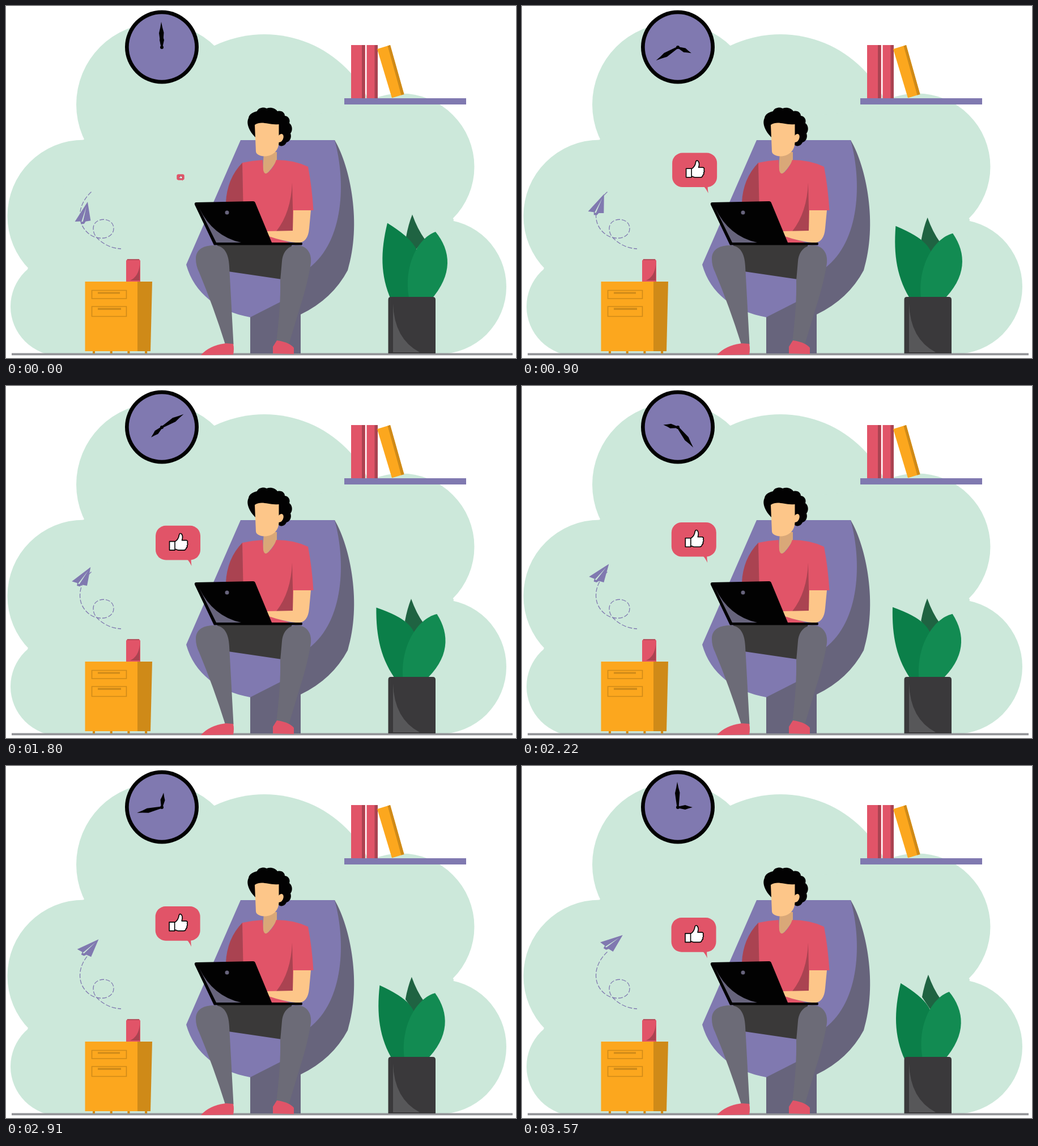
An HTML page with a canvas that plays this animation: 900 by 622 pixels, repeating every 3600 ms.

```html
<!DOCTYPE html>
<html lang="en">
<head>
<meta charset="utf-8">
<title>Working from the armchair</title>
<style>
html, body { margin: 0; width: 100%; height: 100%; overflow: hidden; background: #fff; }
canvas { display: block; width: 900px; height: 622px; }
</style>
</head>
<body>
<canvas id="stage" width="900" height="622"></canvas>
<script>
const ctx = document.getElementById('stage').getContext('2d');
const LOOP = 3600, STEP = 30, RAD = Math.PI / 180;
const C = {
  mint: '#cce8da', purple: '#8079b0', slate: '#67647c', red: '#e15468', wine: '#aa4351',
  amber: '#fca71e', ochre: '#cf8a18', skin: '#fdc689', neck: '#d9a878', ink: '#020202',
  coal: '#3a393b', ash: '#575759', leg: '#6c6b77', leaf: '#0b7f49', leafLight: '#128b52', leafDark: '#1f6342'
};

const shape = (d, color) => { ctx.fillStyle = color; ctx.fill(new Path2D(d)); };
const rect = (x, y, w, h, color) => { ctx.fillStyle = color; ctx.fillRect(x, y, w, h); };
const disc = (x, y, r, color) => {
  ctx.fillStyle = color;
  ctx.beginPath();
  ctx.arc(x, y, r, 0, 7);
  ctx.fill();
};
const outline = (d, color, width) => {
  ctx.strokeStyle = color;
  ctx.lineWidth = width;
  ctx.stroke(new Path2D(d));
};
const placed = (x, y, angle, draw) => {
  ctx.save();
  ctx.translate(x, y);
  ctx.rotate(angle * RAD);
  draw();
  ctx.restore();
};

function backdrop() {
  rect(0, 0, 900, 622, '#fff');
  ctx.save();
  ctx.beginPath();
  ctx.rect(0, 0, 900, 614);
  ctx.clip();
  disc(95, 531, 87, C.mint);
  disc(137, 371, 134.5, C.mint);
  disc(268, 174, 144, C.mint);
  disc(456, 254, 204, C.mint);
  disc(697, 284, 129.5, C.mint);
  disc(764, 496, 119, C.mint);
  shape('M95 614L38 465L137 236L368 70L456 200L640 180L790 377L764 614Z', C.mint);
  ctx.restore();
  rect(10, 613.4, 884, 3.8, '#939498');
}

function shelf() {
  rect(609, 69, 25, 94, C.red);
  rect(628, 69, 5, 94, C.wine);
  rect(636.5, 69, 19.5, 94, C.red);
  rect(650.5, 69, 5.5, 94, C.wine);
  shape('M655 76L678 69L702.5 156L681 162.5Z', C.amber);
  shape('M673.5 70.5L678 69L702.5 156L697.5 157.5Z', C.ochre);
  rect(597, 163, 215, 11, C.purple);
}

function clock(t) {
  const hour = 450 * t / 3570;
  // The minute hand slows down in three steady stages.
  const minute = Math.min(0.3 * t, 60 + 0.2 * t, 720 - 0.1535 * (3570 - t));
  disc(275, 72.5, 65, C.ink);
  disc(275, 72.5, 58.3, C.purple);
  placed(275, 73, hour, () => shape('M0-26Q2-18 4-13L1.2 0H-1.2L-4-13Q-2-18 0-26Z', C.ink));
  placed(275, 73, minute, () => shape('M-1-45Q1-34 3.5-26L1.5 0H-1.5L-5-25Q-2.5-35-1-45Z', C.ink));
  disc(275, 73, 3, C.ink);
}

function cabinet() {
  for (let i = 0; i < 4; i++) rect(153 + i * 30.7, 609, 4, 5, C.ochre);
  rect(139.5, 487, 92.5, 123, C.amber);
  shape('M232 487H258L255 610H232Z', C.ochre);
  outline('M151.5 502.5H212.5V517H151.5ZM151.5 531H212.5V548.5H151.5Z', C.ochre, 1.6);
  rect(162, 505.5, 39, 3, C.ochre);
  rect(162, 533.5, 41, 3.5, C.ochre);
  shape('M214 447.5H235L237 450V487H212V450Z', C.red);
  rect(214, 447.5, 21, 1.5, C.wine);
  shape('M236 457V485H219Q234 478 236 457Z', C.wine);
}

function trail() {
  ctx.setLineDash([8, 3]);
  outline('M150.5 328.5C125 352 124 386 147 403C164 416 190 411 190 393C190 372 154 372 154 393C154 402 158 408 164 413Q181 428 203 429', C.purple, 1.3);
  ctx.setLineDash([]);
}

function plane(t) {
  const u = t / LOOP;
  placed(144 + 34.5 * u ** 2.7, 346 - 57 * u + 9.5 * u * u, 14 + 40 * u, () => {
    shape('M0 0L-13.3 39.5L-3.5 36.5L-1.5 41L3.5 39L5 34.5L13.3 31Z', C.purple);
    shape('M0 8L-2 37L0.5 36Z', C.mint);
  });
}

function chair() {
  shape('M580 237C608 285 628 385 603 467Q576 518 520 545V614H431V545L484 515Z', C.slate);
  shape('M414 237H580C600 310 597 415 535 463L484 523L431 550C375 540 332 508 318 457Z', C.purple);
}

function head() {
  shape('M455 258H478V273Q467 291 460 296Q454 298 453 290Z', C.neck);
  shape('M440 232C430 222 423 208 428 198C429 190 438 187 443 186C445 179 456 178 460 181C467 178 476 181 479 186C487 184 492 189 492 194C499 195 502 201 500 207C506 211 506 221 502 225C505 233 500 240 495 241C491 249 483 249 480 244Z', C.ink);
  shape('M439 210C452 202 463 211 481.5 209V229C486 223 491 227 489.5 233Q488 240 481.5 241C481 263 460 268 449 264.5Q441 262 441 257Z', C.skin);
}

function torso() {
  shape('M417 277Q435 273 453 272L454 290C456 299 461 296 464 293Q473 284 477 272Q508 272 533 284Q540 320 542.5 361H507V398H418Z', C.red);
  shape('M417 277Q390 305 388 347H418.5Z', C.wine);
  shape('M505 312L507 398H477Q503 365 505 312Z', C.wine);
  shape('M462 406L504 419H464Z', C.red);
  shape('M507 361H538L535 393Q533 418 515 418.5Q490 416 464 407L460 398L506 397Z', C.skin);
}

function legs() {
  shape('M372 421H505L487 483L392 469Z', '#3a3939');
  shape('M335 447C335 429 350 423 367 423C385 423 393 437 394 460L401.5 598H387Q366 531 341 471Q335 459 335 447Z', C.leg);
  shape('M487 451C489 432 500 423 513 423C530 423 540 436 538 454Q534 484 519 532L499 598L477 593Q485 530 484 485Z', C.leg);
  shape('M344 617Q358 600 388 596L401 597Q403 606 401 616Z', C.red);
  shape('M471 614V602L478 591Q500 594 508 604V615Z', C.red);
}

function laptop() {
  shape('M333 351Q332 347 336 347L436 345Q439 345 440 348L469 418H522Q524 420 522 422.5H367Z', C.ink);
  shape('M341 357Q365 407 415 418H371Z', C.slate);
  disc(390, 365, 3.5, C.slate);
}

function plant(t) {
  const sway = Math.sin(Math.PI * t / LOOP), drift = -4.3 * t / LOOP;
  placed(-2 * sway, 7.4 * sway, 0, () =>
    shape('M717 368.5Q710 386 706 408L722 432L739 412Q726 394 717 368.5Z', C.leafDark));
  placed(699 + drift, 464, -13 * sway, () =>
    shape('M-26-80.5C-38-31-39 12-19 56H23C37 17 35-22 21-41Q10-58-26-80.5Z', C.leaf));
  placed(726 + drift, 440, 6.7 * sway, () =>
    shape('M32-41C-2-29-26 25-14 80H23C64 34 59-8 32-41Z', C.leafLight));
  shape('M674.5 519Q674.5 514 679 514H753Q758 514 758 519V614H674.5Z', C.coal);
  shape('M683 526Q685 588 730 612H683Z', C.ash);
}

function bubble(t) {
  const size = Math.min(1, 0.17 + t / 720);
  const x = 303 + 5 * Math.exp(-t / 800);
  const y = Math.max(268, 302.5 - 0.0141 * t) + 0.0304 * Math.max(0, t - 2570);
  placed(x, y, 0, () => {
    ctx.scale(size, size);
    ctx.fillStyle = C.red;
    ctx.beginPath();
    ctx.roundRect(-39.5, -30.3, 79, 60.6, 18);
    ctx.fill();
    shape('M16 29Q20 33 24 41Q23 34 23 28Z', C.red);
    const thumb = 'M-15-2.5H-5.5V13H-15ZM-5.5-2Q1-6 2-14Q3-18 6-16Q9.5-12 7-4.5H15Q18-3 16.5 0Q18 3 16 4.5Q17 8 14.5 9Q14 13 10 13H0L-5.5 11Z';
    shape(thumb, '#fff');
    ctx.lineJoin = 'round';
    outline(thumb, C.ink, 1.6);
  });
}

function frame() {
  const t = Math.floor(performance.now() % LOOP / STEP) * STEP;
  backdrop();
  shelf();
  clock(t);
  trail();
  plane(t);
  cabinet();
  chair();
  head();
  torso();
  legs();
  laptop();
  plant(t);
  bubble(t);
  requestAnimationFrame(frame);
}
frame();
</script>
</body>
</html>
```
